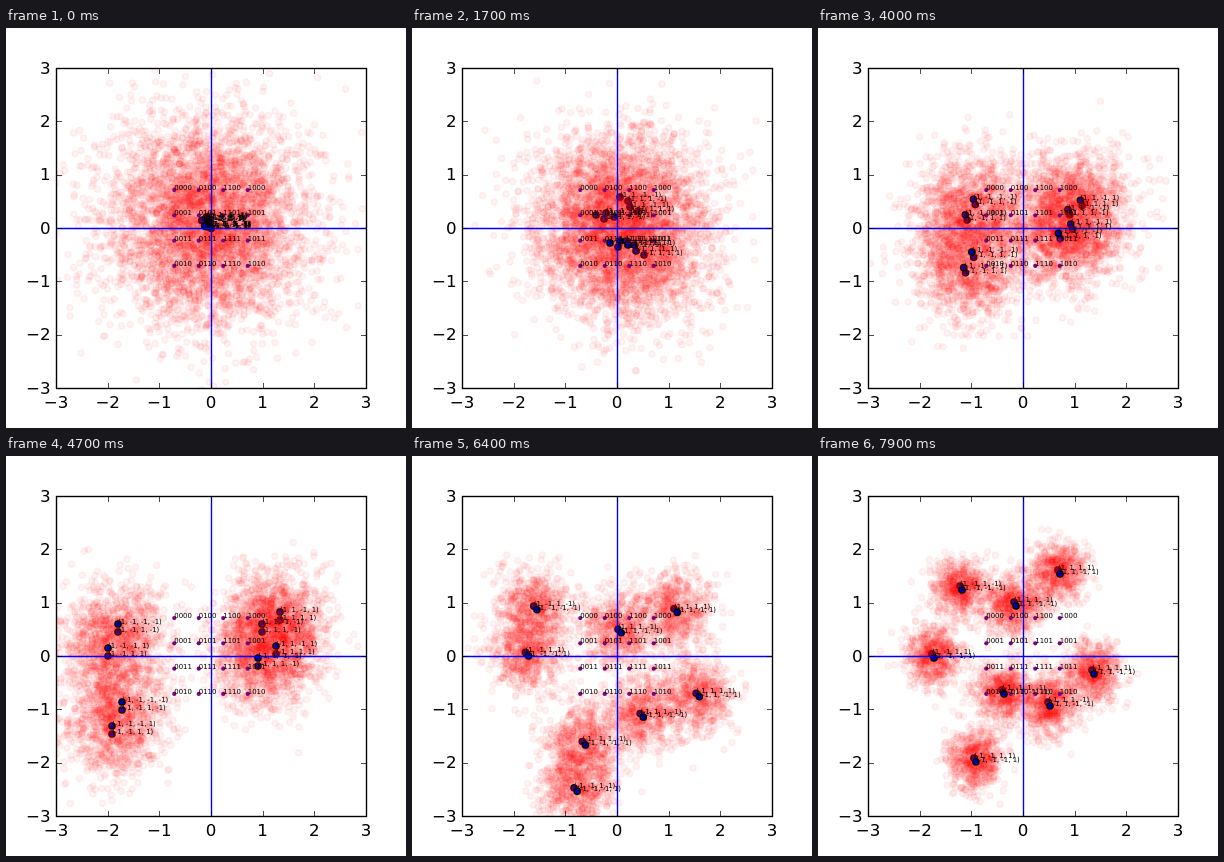
Recreate the animation shown at these times as an HTML page with a canvas. Size 400 by 400 pixels, loop 8000 ms.

```html
<!DOCTYPE html>
<html lang="en">
<head>
<meta charset="utf-8">
<title>Learned constellation</title>
<style>
html, body { margin: 0; width: 100%; height: 100%; overflow: hidden; background: #fff; }
canvas { display: block; width: 400px; height: 400px; }
</style>
</head>
<body>
<canvas id="plot" width="400" height="400"></canvas>
<script>
const ctx = document.getElementById('plot').getContext('2d');
const STEP = 100, STEPS = 80, PER_SYMBOL = 312;
const LEFT = 50, TOP = 40, W = 310, H = 320;
const FONT = '"DejaVu Sans", sans-serif';
const px = x => 205 + x * W / 6;
const py = y => 200 - y * H / 6;
const snap = v => Math.round(v) + 0.5;

// Each symbol is four signs; its centre is a weighted sum of sign products.
const symbols = Array.from({ length: 16 }, (_, n) => {
  const [a, b, c, d] = [8, 4, 2, 1].map(bit => n & bit ? -1 : 1);
  return {
    label: '(' + [a, b, c, d].join(', ') + ')',
    terms: { o: 1, a, b, ab: a * b, d, bd: b * d, c }
  };
});

const spread = {
  at: 17, o: [210, 200], a: [-5, -18], b: [10, -2], ab: [2, -4], d: [5, 2], bd: [0, 3], c: [4, 2]
};

// The start is the first spread, drawn together near the origin.
const start = { at: 0 };
for (const t in symbols[0].terms) start[t] = spread[t].map(v => v / 5);
start.o = [201, 195];

const keys = [
  start,
  spread,
  { at: 32, o: [220, 196], a: [6, -9], b: [20, 5], ab: [2, 3], d: [0, 0], bd: [3, -3], c: [2, 1] },
  { at: 47, o: [186, 203], a: [0, -28], b: [77, -20], ab: [2, 11], d: [2, 3], bd: [7, -9], c: [0, 4] },
  { at: 57, o: [210, 223], a: [-20, -61], b: [46, -23], ab: [8, 16], d: [11, -1], bd: [10, -12], c: [-3, 1] },
  { at: 72, o: [178, 227], a: [-15, -48], b: [58, -12], ab: [5, 9], d: [13, 15], bd: [23, -22], c: [0, -5] },
  { at: 79, o: [193, 200], a: [-19, -51], b: [43, -18], ab: [2, 1], d: [4, 9], bd: [18, -25], c: [-1, -2] }
];

function centresAt(step) {
  const i = Math.max(1, keys.findIndex(k => k.at >= step));
  const p = keys[i - 1], q = keys[i];
  const u = (step - p.at) / (q.at - p.at);
  return symbols.map(({ terms }) => [0, 1].map(axis => {
    let sum = 0;
    for (const t in terms) sum += terms[t] * (p[t][axis] * (1 - u) + q[t][axis] * u);
    return sum;
  }));
}

const noiseAt = step => 0.95 * Math.exp(-Math.pow(step / 65, 1.15));

function seeded(s) {
  return () => {
    s = (s + 0x6D2B79F5) | 0;
    let t = Math.imul(s ^ (s >>> 15), 1 | s);
    t = (t + Math.imul(t ^ (t >>> 7), 61 | t)) ^ t;
    return ((t ^ (t >>> 14)) >>> 0) / 4294967296;
  };
}

function disc(x, y, r, edge) {
  ctx.beginPath();
  ctx.arc(x, y, r, 0, 2 * Math.PI);
  ctx.fill();
  if (edge) ctx.stroke();
}

function line(x1, y1, x2, y2) {
  ctx.beginPath();
  ctx.moveTo(x1, y1);
  ctx.lineTo(x2, y2);
  ctx.stroke();
}

function cloud([x, y], sigma, rnd) {
  ctx.fillStyle = ctx.strokeStyle = 'rgba(255,0,0,0.05)';
  for (let i = 0; i < PER_SYMBOL; i++) {
    const r = sigma * Math.sqrt(-2 * Math.log(1 - rnd()));
    const a = 2 * Math.PI * rnd();
    disc(x + r * Math.cos(a) * W / 6, y + r * Math.sin(a) * H / 6, 3.1, true);
  }
}

function grid(put) {
  const level = [0.711, 0.237, -0.237, -0.711];
  const gray = ['00', '01', '11', '10'];
  level.forEach((y, row) => level.forEach((x, col) =>
    put(px(-x), py(y), gray[col] + gray[row])));
}

function axes() {
  const right = LEFT + W, bottom = TOP + H;
  ctx.lineWidth = 1.39;
  ctx.strokeStyle = '#00f';
  line(LEFT, snap(200), right, snap(200));
  line(snap(205), TOP, snap(205), bottom);

  ctx.strokeStyle = ctx.fillStyle = '#000';
  ctx.strokeRect(snap(LEFT), snap(TOP), W, H);
  ctx.lineWidth = 0.7;
  ctx.font = '16.67px ' + FONT;
  for (let v = -3; v <= 3; v++) {
    const x = snap(px(v)), y = snap(py(v));
    const text = String(v).replace('-', '\u2212');
    line(x, TOP, x, TOP + 6);
    line(x, bottom, x, bottom - 5);
    line(LEFT, y, LEFT + 6, y);
    line(right, y, right - 5, y);
    ctx.textAlign = 'center';
    ctx.fillText(text, px(v), 380);
    ctx.textAlign = 'right';
    ctx.fillText(text, 44.5, py(v) + 5.5);
  }
}

function draw(step) {
  const centres = centresAt(step);
  const sigma = noiseAt(step);
  const rnd = seeded(step * 7919 + 17);
  ctx.fillStyle = '#fff';
  ctx.fillRect(0, 0, 400, 400);

  ctx.save();
  ctx.beginPath();
  ctx.rect(LEFT, TOP, W, H);
  ctx.clip();
  ctx.lineWidth = 1.39;
  // Later clouds tint the earlier centres.
  for (const p of centres) {
    cloud(p, sigma, rnd);
    ctx.fillStyle = '#0000b4';
    ctx.strokeStyle = '#000';
    disc(p[0], p[1], 3.1, true);
  }
  ctx.fillStyle = '#800080';
  grid((x, y) => disc(x, y, 2.1));
  ctx.restore();

  axes();
  ctx.font = '6.94px ' + FONT;
  ctx.textAlign = 'left';
  grid((x, y, text) => ctx.fillText(text, x, y));
  centres.forEach(([x, y], n) => ctx.fillText(symbols[n].label, x, y));
}

let shown = -1;
const begin = performance.now();
function tick() {
  const step = Math.floor((performance.now() - begin) / STEP) % STEPS;
  if (step !== shown) draw(shown = step);
  requestAnimationFrame(tick);
}
tick();
</script>
</body>
</html>
```
